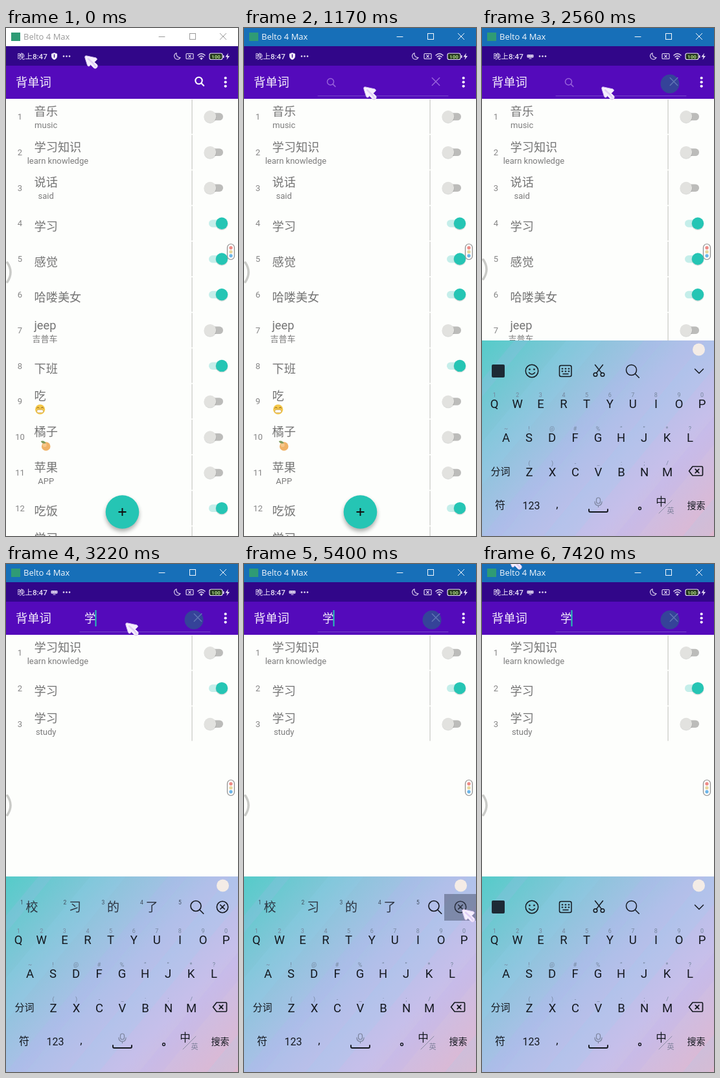
An HTML page for the animation above (7560 ms loop, 358 by 782 pixels).

```html
<!DOCTYPE html>
<html lang="zh-CN">
<head>
<meta charset="utf-8">
<title>Vocabulary search</title>
<style>
html, body { margin: 0; width: 100%; height: 100%; overflow: hidden; background: #fdfefc; }
svg { display: block; width: 358px; height: 782px; font-family: Roboto, "Noto Sans CJK SC", "Noto Sans CJK", sans-serif; }
.line { fill: none; stroke-linecap: round; stroke-linejoin: round; }
</style>
</head>
<body>
<svg id="stage" viewBox="0 0 358 782"></svg>
<script>
const LOOP = 7560;
const T = { click: 450, open: 600, kbFrom: 1180, kbTo: 1450, type: 2650, press: 5300, release: 5600 };
const TEAL = '#25c5b4', INK = '#14181f';

const text = (x, y, s, size, fill, extra = '') =>
  `<text x="${x}" y="${y}" font-size="${size}" fill="${fill}" ${extra}>${s}</text>`;
const mid = (x, y, s, size, fill, extra = '') => text(x, y, s, size, fill, 'text-anchor="middle" ' + extra);
const rect = (x, y, w, h, fill, r = 0, extra = '') =>
  `<rect x="${x}" y="${y}" width="${w}" height="${h}" rx="${r}" fill="${fill}" ${extra}/>`;
const dot = (x, y, r, fill, extra = '') => `<circle cx="${x}" cy="${y}" r="${r}" fill="${fill}" ${extra}/>`;
const line = (d, color, w = 1.5, extra = '') =>
  `<path class="line" d="${d}" stroke="${color}" stroke-width="${w}" ${extra}/>`;
const ring = (x, y, r, color, w) => dot(x, y, r, 'none', `stroke="${color}" stroke-width="${w}"`);
const cross = (x, y, r, color, w) =>
  line(`M${x - r} ${y - r}l${2 * r} ${2 * r}m0 ${-2 * r}l${-2 * r} ${2 * r}`, color, w);
const lens = (x, y, r, color, w) =>
  ring(x, y, r, color, w) + line(`M${x + r * .72} ${y + r * .72}l${r * .75} ${r * .75}`, color, w);
const group = (id, body, extra = '') => `<g id="${id}" ${extra}>${body}</g>`;

function toggle(y, on) {
  const x = on ? 333 : 315;
  return rect(on ? 313 : 308, y - 5.5, 27, 11.5, on ? '#c5eeea' : '#bcbcba', 5.7) +
    dot(x, y + 1, 9.6, '#000', 'opacity=".13"') + dot(x, y, 9.2, on ? TEAL : '#e2e2df');
}

function grin(x, y) {
  return dot(x, y, 7.6, '#f5c84a') + line(`M${x - 5} ${y - 2}q2 -3 3.5 0M${x + 1.5} ${y - 2}q2 -3 3.5 0`, '#7b5520', 1) +
    rect(x - 5, y + .5, 10, 4.5, '#fff', 2.2, 'stroke="#b78b3c" stroke-width=".6"');
}

function orange(x, y) {
  return dot(x, y + 1, 6.8, '#f0b267') + dot(x - 2, y - 1, 3, '#f6c88c') +
    `<path d="M${x} ${y - 4}q-3 -5 -8 -3q2 5 8 3Z" fill="#7d9a5a"/>`;
}

// word, subtitle (text or drawing), switch state
const ALL = [
  ['音乐', 'music', 0], ['学习知识', 'learn knowledge', 0], ['说话', 'said', 0], ['学习', '', 1],
  ['感觉', '', 1], ['哈喽美女', '', 1], ['jeep', '吉普车', 0], ['下班', '', 1], ['吃', grin, 0],
  ['橘子', orange, 0], ['苹果', 'APP', 0], ['吃饭', '', 1], ['学习', 'study', 0]
];
const FOUND = [ALL[1], ALL[3], ALL[12]];

function row([word, sub, on], i) {
  const y = 136.3 + 54.8 * i;
  const cx = word === 'jeep' ? 60 : 43.5 + word.length * 9.1;
  let out = mid(21.5, y + 4.7, i + 1, 13, '#858585') +
    text(43.5, y + (sub ? -1.5 : 11), word, 18.2, '#747474');
  if (typeof sub === 'function') out += sub(cx, y + 12.5 + (i === 9 ? 1 : 0));
  else if (sub) out += mid(cx, y + 17.4, sub, 13, '#7c7c7c');
  return out + rect(286.2, y - 26.5, 1.8, 53, '#d9dad6') + toggle(y, on);
}

function titleBar(bg, fg) {
  return rect(0, 0, 358, 28, bg) + rect(8, 7, 14, 13, '#2f9b75') +
    text(27, 18, 'Belto 4 Max', 13, fg, 'font-family="Open Sans, Noto Sans, sans-serif"') +
    line('M236 13.5h9', fg, 1) + rect(283.5, 8.5, 9, 9, 'none', 0, `stroke="${fg}"`) + cross(335, 13, 4.7, fg, 1);
}

function statusBar() {
  const w = '#e9e2f6';
  return rect(0, 28, 358, 30, '#310689') + text(17.5, 47.8, '晚上8:47', 11.7, w, 'font-weight="500"') +
    group('shield', '<path d="M74.5 38l4.500 1.800v3.200q0 4-4.500 6q-4.500-2-4.500-6v-3.200Z" fill="#f2edfa"/>' + line('M74.500 41v4', '#310689', 1.3)) +
    group('kbIcon', rect(69.5, 41, 10, 4.5, w, 1) + line('M71 43h7', '#310689', .8, 'stroke-dasharray="1 2"') + line('M73 47h3', w, 1)) +
    [89, 93.5, 98].map(x => dot(x, 43.5, 1.3, w)).join('') +
    line('M263 38.500a5 5 0 1 0 6 7a5.500 5.500 0 0 1-6-7Z', w, 1.1) +
    rect(278, 39.500, 11, 8, 'none', 1, `stroke="${w}" stroke-width="1.1"`) + cross(283.5, 43.5, 1.8, w, 1.1) +
    line('M296 42q5.500-5 11 0M298 44.500q3.500-3 7 0M300 46.800q1.500-1.300 3 0', w, 1.4) + dot(301.5, 48, 1, w) +
    rect(314, 39, 20, 9.500, '#23351f', 2.5, `stroke="${w}" stroke-width="1.2"`) + rect(335, 42, 1.5, 4, w) +
    mid(324, 46.600, '100', 8, '#b6e58a', 'font-weight="700"') +
    `<path d="M343 38.500l-4.500 6h3l-1 4.500l4.500-6h-3Z" fill="${w}"/>`;
}

function appBar() {
  const pale = '#9863db';
  return rect(0, 58, 358, 51, '#540abb') + text(15, 90, '背单词', 18.3, '#f5effc') +
    [77, 83.3, 89.6].map(y => dot(338.7, y, 2.1, '#fff')).join('') +
    group('searchBtn', lens(297.5, 81, 5.2, '#fff', 2.1)) +
    group('field', line('M114 104.500h201', '#7546c8', 1) +
      group('hint', lens(133.5, 82.8, 5, pale, 1.5)) +
      cross(296, 82.5, 5.7, pale, 1.5) +
      group('ripple', dot(290, 86, 14.5, '#354399') + cross(296, 82.5, 5.7, '#5f74b4', 1.5)) +
      group('query', text(121, 90, '学', 17.7, '#f5effc')) +
      group('caret', rect(0, 71, 2, 25, TEAL)));
}

function keyRow(letters, hints, x0, y, step) {
  return [...letters].map((c, i) => {
    const x = x0 + step * i;
    return mid(x, y, c, 18.5, INK) + mid(x, y - 17, hints[i], 9, '#75869d');
  }).join('');
}

function scissors(x, y) {
  return ring(x - 5.5, y + 6, 2.8, INK, 1.5) + ring(x + 5.5, y + 6, 2.8, INK, 1.5) +
    line(`M${x - 4} ${y + 3.6}L${x + 6} ${y - 9}M${x + 4} ${y + 3.600}L${x - 6} ${y - 9}`, INK);
}

function keyboard() {
  const stripes = [[-60, 40], [50, 22], [130, 55], [250, 30], [345, 48], [455, 36], [560, 40]].map(([x, w], i) =>
    `<path d="M${x} 481h${w}l-250 301h${-w}Z" fill="${i % 2 ? '#b8a8f0' : '#8fd4ee'}" opacity=".14"/>`).join('');
  const tools = rect(15, 518, 20, 20, '#1d2a35', 2) +
    ring(77, 528, 9.7, INK, 1.5) + dot(73.5, 525.5, 1.3, INK) + dot(80.5, 525.5, 1.3, INK) + line('M72.500 530.500q4.500 5 9 0', INK) +
    rect(119.5, 519.5, 18.5, 17, 'none', 2.5, `stroke="${INK}" stroke-width="1.5"`) +
    line('M123.500 524.500h11M123.500 528.500h11', INK, 1.8, 'stroke-dasharray="1 4"') + line('M125 532.500h8', INK) +
    scissors(180.5, 527.5) + lens(230.5, 526.5, 8, INK, 1.5) + line('M328.500 525l6.500 6.500l6.500-6.500', INK);
  const words = [['校', 40], ['习', 106.5], ['的', 165.5], ['了', 225], ['', 284]].map(([c, x], i) =>
    text(x - 18, 524, i + 1, 8.5, '#3f4b5c') + mid(x, 535, c, 19, '#2c3340')).join('') +
    lens(293, 526.5, 8, INK, 1.6) + ring(334, 528, 8.7, INK, 1.6) + cross(334, 528, 3.3, INK, 1.6);
  return rect(0, 481, 358, 301, 'url(#sky)') + stripes + dot(334.5, 495, 9.5, '#f4ece6') +
    group('tools', tools) + group('words', words) +
    group('pressed', rect(309, 508, 49, 41, '#424963', 0, 'opacity=".48"')) +
    keyRow('QWERTYUIOP', '1234567890', 19.2, 584.5, 35.6) +
    keyRow('ASDFGHJKL', '~!@#%“”*?', 37, 637, 35.5) +
    keyRow('ZXCVBNM', '()-_:;/', 73, 689.5, 35.5) +
    mid(28.5, 687.5, '分词', 15, INK) +
    line('M319.500 682l5.500-7h14q1.500 0 1.500 1.500v11q0 1.500-1.500 1.500h-14Z', INK, 1.7) + cross(332, 682, 2.8, INK, 1.7) +
    mid(28, 740, '符', 16, INK) + mid(76, 740.5, '123', 16, INK) + mid(116, 739, ',', 17, INK) +
    line('M165 741v2q0 2 2 2h25q2 0 2-2v-2', INK, 1.9) +
    rect(176.500, 723, 6, 9, 'none', 3, 'stroke="#7b839c" stroke-width="1.2"') +
    line('M174 729q0 6 5.500 6q5.500 0 5.500-6M179.500 735v2.500', '#7b839c', 1.2) +
    ring(243.5, 739.5, 2, INK, 1.3) + mid(276.5, 734.5, '中', 16.5, INK, 'font-weight="500"') +
    line('M293 727l-20 20', '#8a8ca5', 1) + mid(291, 747, '英', 11, '#7f829b') +
    mid(330.5, 740, '搜索', 14, INK, 'font-weight="500"');
}

const pointer = `<path d="M1 4Q0 0 4 1L18 4Q21 6 18 8L15.500 10.500L20 15Q21 18 18 20Q15 21 13 18L9.500 14.500L8 16.500Q5.500 18 4.500 15Z"
  fill="#f5effd" stroke="#d6c2f0" stroke-width="1"/>` + line('M6 5.500l7 6.500l4 5', '#e0cff6', 2.5);

const stage = document.getElementById('stage');
stage.innerHTML = `<defs>
  <linearGradient id="sky" gradientUnits="userSpaceOnUse" x1="0" y1="491" x2="330" y2="800">
    <stop offset="0" stop-color="#58cbca"/><stop offset=".28" stop-color="#8ec4dc"/>
    <stop offset=".5" stop-color="#b0bfe9"/><stop offset=".72" stop-color="#c6bfea"/><stop offset="1" stop-color="#dfb8d0"/>
  </linearGradient>
  <filter id="soft" x="-30%" y="-30%" width="160%" height="160%"><feGaussianBlur stdDeviation="3"/></filter></defs>` +
  rect(0, 0, 358, 782, '#fdfefc') +
  group('all', ALL.map(row).join('')) + group('found', FOUND.map(row).join('')) +
  group('fab', dot(179.5, 749, 26, '#000', 'opacity=".3" filter="url(#soft)"') + dot(179.5, 745, 25.8, TEAL) +
    line('M173.500 745h12m-6-6v12', '#101010', 1.9, 'style="stroke-linecap:butt"')) +
  group('handle', line('M2 361q10 15 0 30', '#c9cac7', 3.5)) +
  rect(341.5, 332.5, 11, 24, '#fbfbfa', 5.5, 'stroke="#8e8e8e" stroke-width="1.2"') +
  dot(347, 338.3, 2.6, '#ee8b86') + dot(347, 344.5, 2.6, '#e9d79c') + dot(347, 350.6, 2.6, '#6db5e8') +
  group('keys', keyboard()) + statusBar() + appBar() +
  group('idleBar', titleBar('#ffffff', '#9a9a9a')) + group('liveBar', titleBar('#176fb8', '#f4f8fc')) +
  group('pointer', pointer);

const el = {};
stage.querySelectorAll('g[id]').forEach(g => el[g.id] = g);
const show = (id, on) => el[id].setAttribute('visibility', on ? 'inherit' : 'hidden');
const move = (id, x, y) => el[id].setAttribute('transform', `translate(${x} ${y})`);

// time, x, y of the pointer tip
const PATH = [
  [0, 121, 42], [110, 121, 42], [430, 292, 78], [600, 292, 78], [850, 184, 90], [4480, 184, 90],
  [5230, 336, 531], [6250, 336, 531], [7400, 41, -12], [LOOP, 41, -12]
];
const ease = k => k * k * (3 - 2 * k);

function pointerAt(t) {
  const i = PATH.findIndex(p => p[0] > t);
  const [a, b] = [PATH[i - 1], PATH[i]];
  const k = ease((t - a[0]) / (b[0] - a[0]));
  return [a[1] + (b[1] - a[1]) * k, a[2] + (b[2] - a[2]) * k];
}

function caretOn(t) {
  if (t < T.type) return (t - T.open) % 1000 < 500;
  return t < 3650 || (t - 150) % 1000 < 500;
}

function draw(t) {
  const open = t >= T.open, typed = t >= T.type;
  const k = Math.min(1, Math.max(0, (t - T.kbFrom) / (T.kbTo - T.kbFrom)));
  const words = typed && t < T.release;
  show('idleBar', t < T.click);
  show('liveBar', t >= T.click);
  show('searchBtn', !open);
  show('field', open);
  show('hint', open && !typed);
  show('query', typed);
  show('ripple', k > .5);
  show('shield', k <= .5);
  show('kbIcon', k > .5);
  show('caret', open && caretOn(t));
  move('caret', typed ? 137.5 : 121, 0);
  show('all', !typed);
  show('found', typed);
  show('fab', k < 1);
  show('keys', k > 0);
  move('keys', 0, 301 * (1 - k) ** 2);
  move('handle', 0, k > .5 ? -4.5 : 0);
  show('tools', !words);
  show('words', words);
  show('pressed', t >= T.press && t < T.release);
  move('pointer', ...pointerAt(t));
}

const start = performance.now();
function tick() {
  draw((performance.now() - start) % LOOP);
  requestAnimationFrame(tick);
}
tick();
</script>
</body>
</html>
```
